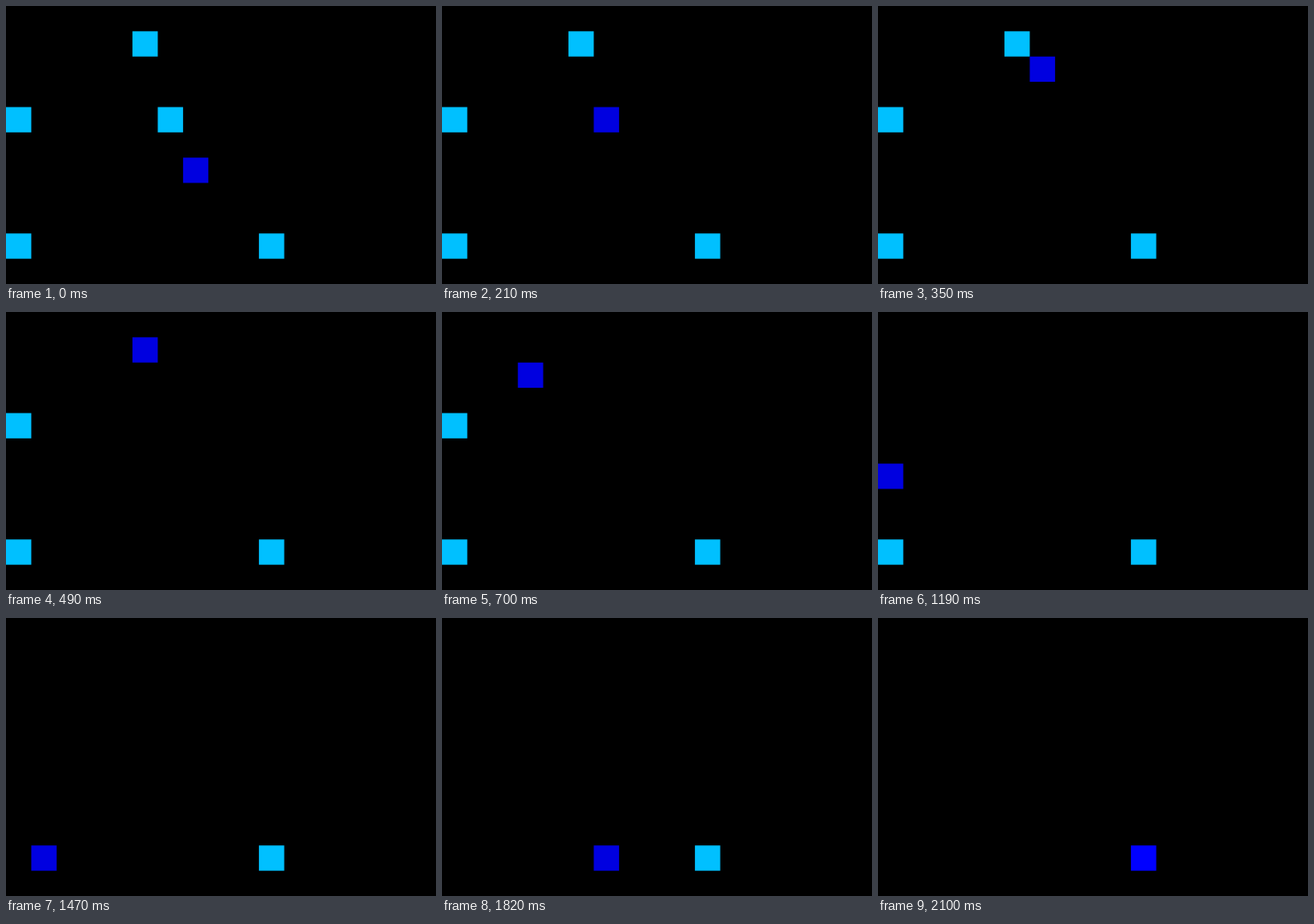
An HTML page with a canvas for the animation above (2.17 s loop, 500x323 px).

```html
<!DOCTYPE html>
<html lang="en">
<head>
<meta charset="utf-8">
<title>Square collector</title>
<style>
  html, body { margin: 0; width: 100%; height: 100%; overflow: hidden; background: #000; }
  canvas { display: block; }
</style>
</head>
<body>
<canvas id="stage" width="500" height="323"></canvas>
<script>
const STEP_MS = 70;
const COLS = 17, ROWS = 11;
const START = [7, 6];
const GOALS = [[6, 4], [5, 1], [0, 4], [0, 9], [10, 9]];

const canvas = document.getElementById('stage');
const ctx = canvas.getContext('2d');
const cellW = canvas.width / COLS, cellH = canvas.height / ROWS;

// Walk one cell at a time along the longer remaining axis; ties go vertical.
function buildPath() {
  let [x, y] = START;
  const path = [{ x, y, reached: 0 }];
  GOALS.forEach(([gx, gy], i) => {
    while (x !== gx || y !== gy) {
      const dx = gx - x, dy = gy - y;
      if (Math.abs(dx) > Math.abs(dy)) x += Math.sign(dx);
      else y += Math.sign(dy);
      path.push({ x, y, reached: x === gx && y === gy ? i + 1 : i });
    }
  });
  return path;
}

function drawCell(x, y, color) {
  ctx.fillStyle = color;
  ctx.fillRect(x * cellW, y * cellH, cellW, cellH);
}

const path = buildPath();
const startTime = performance.now();

function draw() {
  const elapsed = Math.max(0, performance.now() - startTime);
  const { x, y, reached } = path[Math.floor(elapsed / STEP_MS) % path.length];
  ctx.fillStyle = '#000';
  ctx.fillRect(0, 0, canvas.width, canvas.height);
  GOALS.slice(reached).forEach(([gx, gy]) => drawCell(gx, gy, '#00c0ff'));
  drawCell(x, y, reached === GOALS.length ? '#0000ff' : '#0000e0');
  requestAnimationFrame(draw);
}
draw();
</script>
</body>
</html>
```
